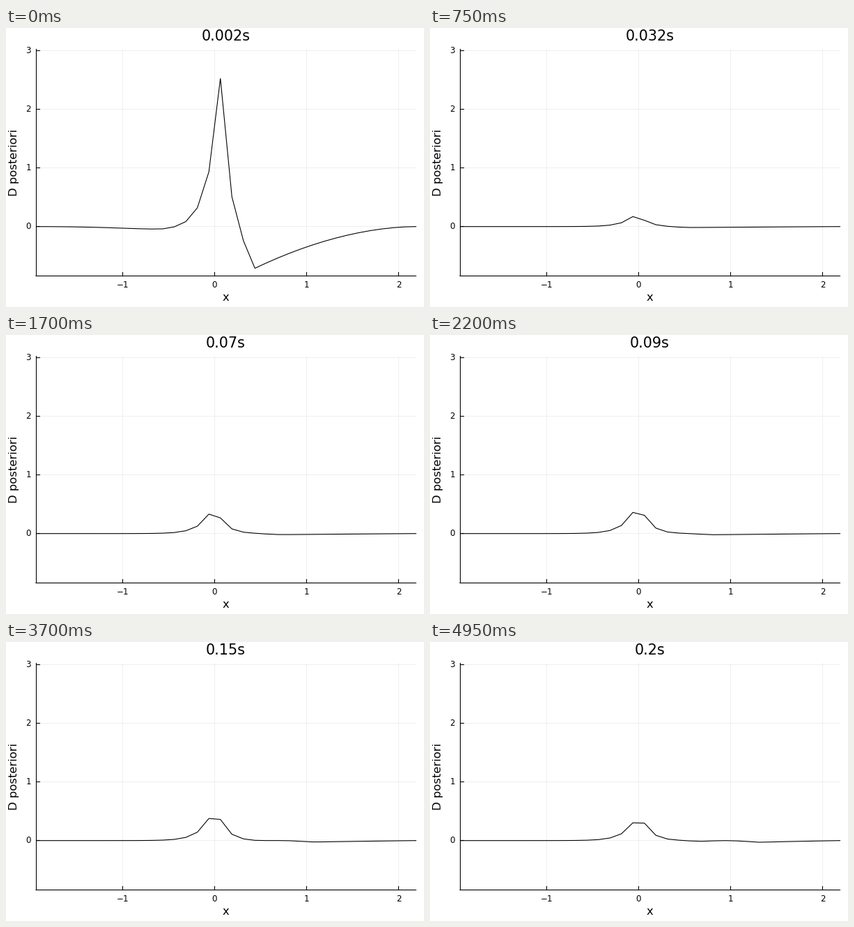
Write a matplotlib script that moves like this. It is 600 by 400 pixels and loops after 5 s.

```python
import numpy as np
import matplotlib.pyplot as plt
from matplotlib.animation import FuncAnimation

plt.rcParams["font.family"] = "DejaVu Sans"

FRAMES, INTERVAL, DT = 100, 50, 0.002
PX = 0.72  # points per pixel at 100 dpi
LEFT, RIGHT, TOP, BOTTOM = 43.5, 588.5, 30.5, 355.5
ZERO, UNIT = 284.7, 84.2
X0, X1, STEP = -1.9375, 2.1875, 0.125
GRID = "#ececec"

x = np.linspace(X0, X1, 34)


def to_x(v):
    return LEFT + (v - X0) * (RIGHT - LEFT) / (X1 - X0)


def to_y(v):
    return ZERO - UNIT * v


def crisp(p):
    """Centre of the pixel that holds p."""
    return np.floor(p) + 0.5


def start_shape():
    """Sharp peak over a shallow left sag and a deep right trough."""
    steps = np.abs(x - STEP / 2) / STEP
    sag = -0.06 * np.minimum(1, ((x - X0) / 1.375) ** 2)
    left = 2.59 * 0.383 ** steps + sag
    trough = -0.71 * ((X1 - x) / 1.75) ** 1.85
    right = trough + 3.54 * 0.4 ** steps * (x < 0.4)
    return np.where(x < 0, left, right)


def bump(k):
    """Central hump: rises, evens out on top, then sinks."""
    rise = 0.388 * (1 - np.exp(-max(0, k - 7) / 14))
    height = rise - 0.085 * (k / 99) ** 8
    balance = 1 - 0.68 * np.exp(-k / 27)
    steps = (np.abs(x) - STEP / 2) / STEP
    return height * np.where(x < 0, 0.38 ** steps, balance * 0.3 ** steps)


def wake(k):
    """Shallow trough behind a front that travels right, with a late ripple."""
    front = 0.4 + 0.0092 * k
    depth = 0.014 + 0.014 * k / 99
    tail = ((X1 - x) / (X1 - front)) ** 1.1
    ramp = np.clip(1 - (front - x) / 0.3, 0, 1)
    ripple = 0.013 * (k / 99) ** 3 * np.exp(-((x - front + 0.65) / 0.15) ** 2)
    return -depth * np.minimum(tail, 1) * ramp - ripple


start = start_shape()


def curve(k):
    fade = 0.05 ** (k / 7)
    return fade * start + (1 - fade) * (bump(k) + wake(k))


fig = plt.figure(figsize=(6, 4), dpi=100, facecolor="white")
ax = fig.add_axes([0, 0, 1, 1])
ax.set_xlim(0, 600)
ax.set_ylim(400, 0)
ax.axis("off")


def stroke(xs, ys, width=1.1, color="black"):
    return ax.plot(xs, ys, color=color, lw=width * PX, snap=False,
                   solid_joinstyle="miter")[0]


def label(px, py, text, size, ha="center", **kw):
    return ax.text(px, py, text, fontsize=size * PX, ha=ha, va="baseline", **kw)


for v in (-1, 0, 1, 2):
    px = crisp(to_x(v))
    stroke([px, px], [TOP, BOTTOM], 0.8, GRID)
    stroke([px, px], [BOTTOM, BOTTOM - 5])
    label(px, 371.5, str(v).replace("-", "\u2212"), 11.9)
for v in (0, 1, 2, 3):
    py = crisp(to_y(v))
    stroke([LEFT, RIGHT], [py, py], 0.8, GRID)
    stroke([LEFT, LEFT + 5], [py, py])
    label(36, py + 4, str(v), 11.9, ha="right")
stroke([LEFT - 0.5, RIGHT], [BOTTOM, BOTTOM])
stroke([LEFT, LEFT], [TOP, BOTTOM])

mid = (LEFT + RIGHT) / 2 - 0.5
label(mid, 391.3, "x", 16.4)
label(16.5, (TOP + BOTTOM) / 2, "D posteriori", 16.4, rotation=90,
      rotation_mode="anchor")
title = label(mid, 18.3, "", 20.8)
line = stroke([], [])


def update(k):
    title.set_text(f"{DT * (k + 1):g}s")
    line.set_data(to_x(x), to_y(curve(k)))
    return title, line


anim = FuncAnimation(fig, update, frames=FRAMES, interval=INTERVAL,
                     repeat=True, repeat_delay=0)
plt.show()
```
